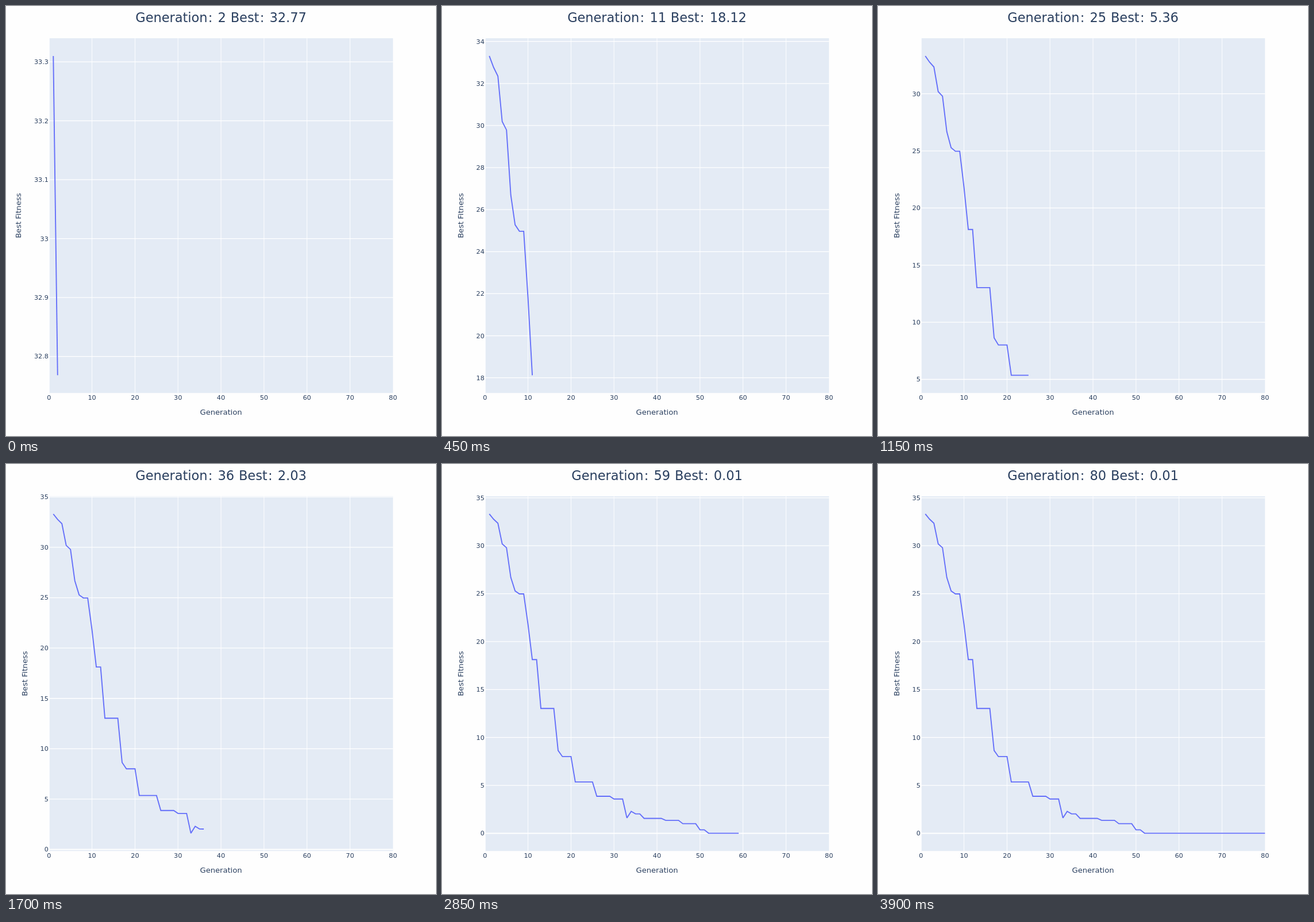
An HTML page for the animation above (3950 ms loop, 748 px wide and 748 px high).

```html
<!DOCTYPE html>
<html lang="en">
<head>
<meta charset="utf-8">
<title>Best fitness by generation</title>
<style>
  html, body { margin: 0; width: 100%; height: 100%; overflow: hidden; background: #fefefe; }
  svg { display: block; width: 100%; height: 100%; }
  text { font: 12px Verdana, "DejaVu Sans", sans-serif; fill: #2a3f5f; text-anchor: middle; }
  .title { font-size: 24px; word-spacing: .034em; }
  .colon { letter-spacing: .058em; }
  .axis { font-size: 14px; }
  #rows text { text-anchor: end; }
  .grid { stroke: #fff; stroke-width: 1; }
  #rows .grid { stroke-width: 1.35; }
  .zero { stroke: #fff; stroke-width: 2; }
  #curve { stroke: #636efa; stroke-width: 2; stroke-miterlimit: 2; fill: none; }
</style>
</head>
<body>
<svg viewBox="0 0 800 800">
  <rect x="80" y="60" width="640" height="660" fill="#e4ebf5"/>
  <g id="columns"></g>
  <g id="rows"></g>
  <path id="curve"/>
  <text class="title" x="400" y="30">Generation<tspan class="colon" dx=".058em">:</tspan> <tspan id="gen"></tspan> Best<tspan class="colon" dx=".058em">:</tspan> <tspan id="best"></tspan></text>
  <text class="axis" x="400" y="760.5">Generation</text>
  <text class="axis" id="yTitle">Best Fitness</text>
</svg>
<script>
  const $ = id => document.getElementById(id);
  const LEFT = 80, TOP = 60, WIDTH = 640, HEIGHT = 660, PAD = HEIGHT * 0.05;
  const STEP = 50, FIRST = 2, LAST = 80;

  // Key points: the best fitness holds from each generation until the next one.
  const changes = {
    1: 33.31, 2: 32.768, 3: 32.35, 4: 30.19, 5: 29.79, 6: 26.69, 7: 25.28, 8: 24.97,
    10: 21.8, 11: 18.12, 13: 13.03, 17: 8.64, 18: 8.01, 21: 5.36, 26: 3.87, 30: 3.58,
    33: 1.61, 34: 2.3, 35: 2.04, 36: 2.03, 37: 1.56, 42: 1.36, 46: 1.01, 50: 0.37, 52: 0.01
  };
  const fitness = [];
  for (let gen = 1; gen <= LAST; gen++) fitness.push(changes[gen] ?? fitness.at(-1));

  const xAt = gen => LEFT + gen / LAST * WIDTH;
  const line = (d, zero) => `<path class="${zero ? "zero" : "grid"}" d="${d}"/>`;
  const label = (x, y, text) => `<text x="${x}" y="${y}">${text}</text>`;

  // Smallest 2, 5 or 10 times a power of ten that gives at most ten ticks.
  function tickStep(range) {
    const rough = range / 10;
    const base = 10 ** Math.floor(Math.log10(rough));
    return base * [2, 5, 10].find(m => m >= rough / base);
  }

  function drawColumns() {
    let out = "";
    for (let gen = 0; gen <= LAST; gen += 10) {
      const x = xAt(gen);
      if (gen < LAST) out += line(`M${x} ${TOP}v${HEIGHT}`, gen === 0);
      out += label(x, 733, gen);
    }
    $("columns").innerHTML = out;
  }

  function draw(gen) {
    const shown = fitness.slice(0, gen);
    const min = Math.min(...shown), max = Math.max(...shown);
    const scale = (HEIGHT - 2 * PAD) / (max - min);
    const yAt = v => TOP + PAD + (max - v) * scale;
    const low = min - PAD / scale, high = max + PAD / scale;
    const step = tickStep(high - low);

    let out = "", chars = 0;
    for (let i = Math.ceil(low / step); i * step <= high; i++) {
      const y = yAt(i * step), text = String(+(i * step).toFixed(2));
      if (y > TOP + 1 && y < TOP + HEIGHT - 1) out += line(`M${LEFT} ${y}h${WIDTH}`, i === 0);
      out += label(79, y + 4.2, text);
      chars = Math.max(chars, text.length);
    }
    $("rows").innerHTML = out;
    $("yTitle").setAttribute("transform", `translate(${chars > 2 ? 27.8 : 39.8} 390) rotate(-90)`);
    $("curve").setAttribute("d", "M" + shown.map((v, i) => `${xAt(i + 1)} ${yAt(v)}`).join("L"));
    $("gen").textContent = gen;
    $("best").textContent = shown[gen - 1].toFixed(2);
  }

  let current = 0;
  function tick() {
    const gen = FIRST + Math.floor(performance.now() / STEP) % (LAST - FIRST + 1);
    if (gen !== current) draw(current = gen);
    requestAnimationFrame(tick);
  }

  drawColumns();
  tick();
</script>
</body>
</html>
```
